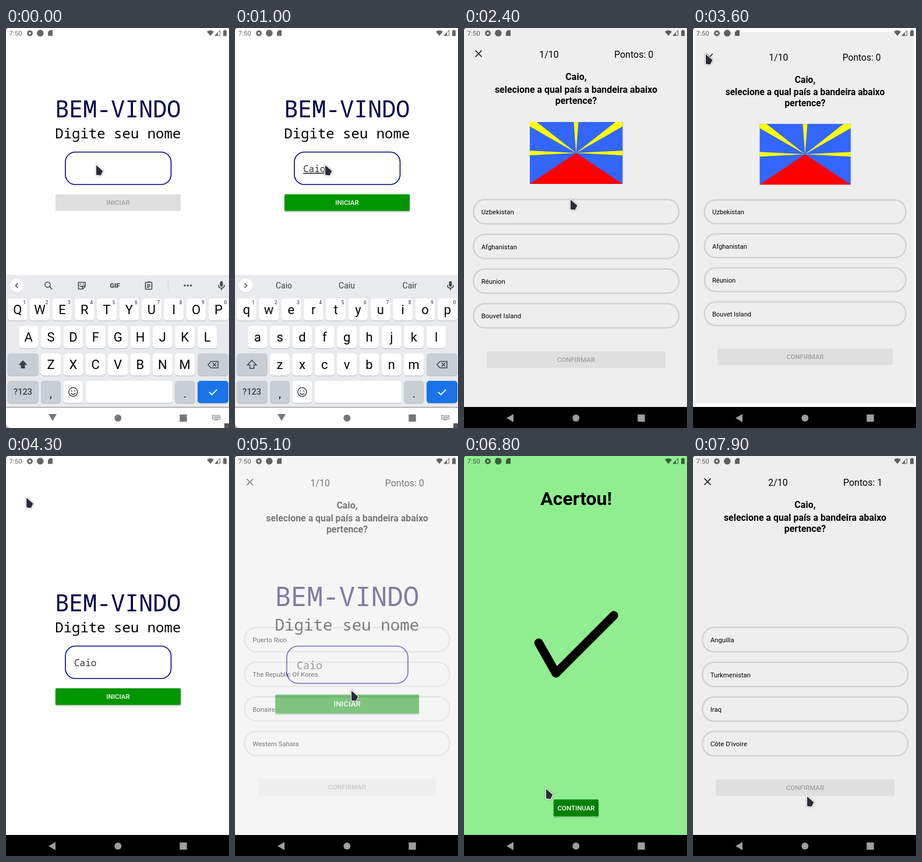
Animation of 383 by 685 pixels, one loop 8000 ms. Source, as an HTML page:

```html
<!DOCTYPE html>
<html lang="pt">
<head>
<meta charset="utf-8">
<title>Quiz de bandeiras</title>
<style>
html, body { margin: 0; width: 100%; height: 100%; overflow: hidden; background: #fff; }
svg { display: block; width: 383px; height: 685px; font-family: Roboto, sans-serif; }
.mono { font-family: "Noto Sans Mono", monospace; }
.mid { text-anchor: middle; }
.line { fill: none; stroke: #45484c; stroke-width: 1.6; }
text { white-space: pre; }
</style>
</head>
<body>
<svg id="stage" viewBox="0 0 383 685" xmlns="http://www.w3.org/2000/svg"></svg>
<script>
const LOOP = 8000, STEP = 100, CX = 191.5, CY = 324.5;
const NAME = 'Caio';
const stage = document.getElementById('stage');
const $ = id => document.getElementById(id);

const rect = (x, y, w, h, fill, rx = 0, more = '') =>
  `<rect x="${x}" y="${y}" width="${w}" height="${h}" rx="${rx}" fill="${fill}" ${more}/>`;
const text = (x, y, size, str, more = '') =>
  `<text x="${x}" y="${y}" font-size="${size}" ${more}>${str}</text>`;
const path = (d, more = 'class="line"') => `<path d="${d}" ${more}/>`;
const circle = (x, y, r, more) => `<circle cx="${x}" cy="${y}" r="${r}" ${more}/>`;
const group = (id, body, more = '') => `<g id="${id}" ${more}>${body}</g>`;

function button(x, y, w, label, fill, color) {
  const shadow = color === '#fff' ? 'filter="url(#drop)"' : '';
  return rect(x, y, w, 28.5, fill, 1.5, shadow) +
    text(x + w / 2, y + 18.2, 11.5, label, `class="mid" font-weight="500" fill="${color}"`);
}

// A button with a grey "off" and a green "on" version
const toggleButton = (id, x, y, w, label, green) =>
  group(id + 'Off', button(x, y, w, label, '#dfdfdf', '#a1a1a1')) +
  group(id + 'On', button(x, y, w, label, green, '#fff'));

function homeScreen() {
  return group('home', group('homeBody',
    text(192.3, 152.5, 40, 'BEM-VINDO', 'class="mono mid" fill="#00004d"') +
    text(192.3, 189, 24, 'Digite seu nome', 'class="mono mid"') +
    rect(102, 212.5, 181.5, 55.5, '#fff', 17, 'stroke="#00008b" stroke-width="1.6"') +
    text(117, 247, 16, '', 'class="mono" id="typed" fill="#333"') +
    rect(117, 229, 1.4, 22, '#00695c', 0, 'id="caret"') +
    toggleButton('start', 85, 284.7, 215, 'INICIAR', '#009600')));
}

function option(id, label, i) {
  const y = 293.8 + i * 59.4;
  return group(`${id}opt${i}`,
    rect(16.2, y, 352.8, 41.5, 'none', 20, 'stroke="#d2d2d2" stroke-width="2.6"') +
    text(29.7, y + 25.4, 11.4, label));
}

function question(id, count, points, options, flag) {
  const bold = 'class="mid" font-weight="700"';
  return group(id,
    rect(0, 0, 383, 649, '#eee') +
    path('M19.5 38.5L30.5 49.5M30.5 38.5L19.5 49.5', 'stroke="#000" stroke-width="1.5"') +
    text(146, 51, 16, count, 'class="mid"') +
    text(258, 51, 16, 'Pontos: ' + points) +
    text(192.5, 89, 16, NAME + ',', bold) +
    text(192.5, 111, 15.9, 'selecione a qual país a bandeira abaixo', bold) +
    text(192.5, 130, 15.9, 'pertence?', bold) +
    group(id + 'flag', flag) +
    options.map((label, i) => option(id, label, i)).join('') +
    toggleButton(id + 'ok', 39, 553.7, 307, 'CONFIRMAR', '#008000'));
}

function rayFlag() {
  const ray = (a, b, c = '') => path(`M192.5 214L${a}L${c ? c + 'L' : ''}${b}Z`, 'fill="#ff0"');
  return rect(113, 161, 159.5, 106, '#36f') +
    ray('113 210', '113 218') + ray('272.5 210', '272.5 218') +
    ray('188.5 161', '196.5 161') +
    ray('113 168.5', '125 161', '113 161') + ray('272.5 168.5', '260 161', '272.5 161') +
    path('M113 267L192.5 214L272.5 267Z', 'fill="#f00"');
}

function starFlag() {
  let star = '';
  for (let i = 0; i < 10; i++) {
    const r = i % 2 ? 6.7 : 17.5, a = i * Math.PI / 5;
    star += `${143.7 + r * Math.sin(a)},${213.7 - r * Math.cos(a)} `;
  }
  return [0, 1, 2, 3, 4].map(i =>
    rect(113, 161 + i * 21.2, 159, 21.2, i % 2 ? '#fff' : '#e00')).join('') +
    path('M113 161L205 214L113 267Z', 'fill="#0050f0"') +
    `<polygon points="${star}" fill="#fff"/>`;
}

function resultScreen() {
  return group('result',
    rect(0, 0, 383, 649, '#90ee90') +
    text(192.7, 84, 32, 'Acertou!', 'class="mid" font-weight="700"') +
    path('M128.3 320L158 372L257.3 273', 'fill="none" stroke="#000" stroke-width="15" stroke-linecap="round" stroke-linejoin="round"') +
    button(154, 588.3, 77, 'CONTINUAR', '#008000', '#fff'));
}

const key = (x, y, w, fill = '#fff') =>
  rect(x, y + 1, w, 38, '#b4b7bb', 5) + rect(x, y, w, 38, fill, 5);

function keyboard() {
  const rows = [['QWERTYUIOP', 2.7, 463], ['ASDFGHJKL', 21.8, 510.3], ['ZXCVBNM', 60, 557.3]];
  const grey = '#c9cdd4';
  let keys = '', upper = '', lower = '';
  for (const [letters, x0, y] of rows) {
    [...letters].forEach((c, i) => {
      const x = x0 + i * 38.35;
      keys += key(x, y, 34);
      upper += text(x + 17, y + 27, 22, c, 'class="mid"');
      lower += text(x + 17, y + 26.5, 22, c.toLowerCase(), 'class="mid"');
      if (y === 463) keys += text(x + 29, y + 10, 8.5, (i + 1) % 10, 'class="mid" font-weight="500" fill="#55585c"');
    });
  }
  const shift = 'M29 569L36.5 577H32.5V583H25.5V577H21.5Z';
  keys += key(2.7, 557.3, 53, grey) + key(329, 557.3, 53, grey) +
    key(2.7, 604.3, 53, grey) + key(60, 604.3, 34, grey) + key(98.3, 604.3, 34) +
    key(136.6, 604.3, 149.4) + key(290.3, 604.3, 34, grey) + key(329, 604.3, 53, '#1a73e8') +
    path('M347 576.5L352 571H364V582H352Z M355 573.5L361 579.5M361 573.5L355 579.5') +
    text(29, 628, 14.5, '?123', 'class="mid" font-weight="500" fill="#3c4043"') +
    text(77, 633, 18, ',', 'class="mid"') + text(307.3, 633, 18, '.', 'class="mid"') +
    circle(115.3, 623.3, 7.5, 'class="line"') +
    circle(112.7, 621.5, 1.1, 'fill="#45484c"') + circle(117.9, 621.5, 1.1, 'fill="#45484c"') +
    path('M111.3 625Q115.3 630 119.3 625') +
    path('M349 623.5L353.5 628L362.5 619', 'fill="none" stroke="#fff" stroke-width="1.8"');
  const tools =
    circle(71.5, 439.5, 4.5, 'class="line"') + path('M75 443L79.5 447.5') +
    path('M124.5 435.5H136V443L131.5 447H124.5ZM136 442H131.5V447M127 441Q129 445 132 441M127 438.5H129M132 438.5H134') +
    text(187, 445, 11.5, 'GIF', 'class="mid" font-weight="800" fill="#45484c"') +
    rect(239.5, 435.5, 11, 12, 'none', 1, 'class="line"') +
    path('M242.5 435H247.5M242 439.5H248M242 442H248M242 444.5H246') +
    rect(278, 432, 1, 18, '#d0d2d6') +
    [307, 312.3, 317.6].map(x => circle(x, 441, 1.7, 'fill="#45484c"')).join('');
  return group('keyboard',
    rect(0, 423, 383, 227, '#e8eaed') + keys +
    group('upper', upper + path(shift, 'fill="#3c4043"')) +
    group('lower', lower + path(shift)) +
    circle(18.5, 441.7, 12, 'fill="#c8cacd"') + circle(18.5, 441, 12, 'fill="#fff"') +
    path('', 'id="chevron" class="line"') + group('tools', tools) +
    [84, 192, 300].map((x, i) => text(x, 446, 14, '', `id="hint${i}" class="mid" fill="#3c4043"`)).join('') +
    rect(367.5, 433.5, 5, 9.5, '#45484c', 2.5) + path('M364.8 440Q365 445.5 370 445.5Q375 445.5 375.2 440M370 445V449'));
}

function statusBar() {
  let teeth = '';
  for (let i = 0; i < 8; i++) teeth += rect(39.8, 3.8, 2.4, 3, '#000', 0, `transform="rotate(${i * 45} 41 9)"`);
  return `<g opacity=".6">` + text(5.5, 13, 11.5, '7:50') + teeth +
    circle(41, 9, 3, 'fill="none" stroke="#000" stroke-width="2.2"') +
    circle(58.8, 8.8, 5.8, '') +
    path('M75 3.8H80V13.5H72V7Z', '') +
    path('M345 6.3Q351 1.5 357 6.3L351 13.5Z', '') +
    path('M358.8 13L367.5 4V13Z', 'fill="none" stroke="#000" stroke-width="1"') + path('M359 13L364 7.5V13Z', '') +
    path('M373 4.5H374.7V3.2H377.3V4.5H379V13.8H373Z', '') + '</g>' +
    path('M0 0H3Q.6 .6 0 3Z', 'fill="#333"');
}

function navBar() {
  const icons = circle(192.3, 668, 6, '') + rect(298.3, 661.7, 12.4, 12.4, 'inherit');
  const shared = fill => `<g fill="${fill}">` + circle(192.3, 668, 6, '') + path('M298.3 661.8H310.7V674.2H298.3Z', '');
  return group('navDark', rect(0, 649, 383, 36, '#000') + shared('#9e9e9e') + path('M73 668L85 661V675Z', '') + '</g>') +
    group('navLight', rect(0, 649.5, 383, 36, '#fff') + shared('#777') + path('M73 661H87L80 673Z', '') + '</g>' +
      rect(355, 664, 12.5, 5.5, 'none', 0, 'stroke="#888" stroke-width="2" stroke-dasharray="1.5 1"') +
      rect(358, 670.5, 6, 1.3, '#888') + rect(357, 666, 9, 1.4, '#888'));
}

stage.innerHTML =
  '<defs><filter id="drop" x="-10%" y="-20%" width="120%" height="160%"><feDropShadow dx="0" dy="1.3" stdDeviation="1.1" flood-opacity=".35"/></filter></defs>' +
  rect(0, 0, 383, 685, '#fff') + homeScreen() +
  question('q1', '1/10', 0, ['Uzbekistan', 'Afghanistan', 'Réunion', 'Bouvet Island'], rayFlag()) +
  question('q2', '1/10', 0, ['Puerto Rico', 'The Republic Of Korea', 'Bonaire', 'Western Sahara'], starFlag()) +
  resultScreen() +
  question('q3', '2/10', 1, ['Anguilla', 'Turkmenistan', 'Iraq', "Côte D'ivoire"], '') +
  keyboard() + navBar() + statusBar() +
  group('corners', path('M0 677Q1 684 8 685H0Z', 'fill="#aaa"') + rect(375, 677, 8, 8, '#555')) +
  group('cursor', path('M0 0L11.5 10L7.5 17.5L0 16.5Z', 'fill="#2a2d38" stroke="#fff" stroke-width="2.4" paint-order="stroke" style="filter:drop-shadow(0 .5px .8px #0007)"'));

// Cursor stops: time, x, y
const stops = [
  [0, 155, 235], [1300, 155, 235], [1500, 160, 250], [1700, 160, 250], [1900, 183, 294],
  [2700, 183, 294], [3300, 22, 45], [4200, 22, 45], [4800, 200, 402], [5300, 200, 402],
  [5900, 156, 316], [6100, 156, 316], [6600, 141, 570], [6900, 141, 570], [7400, 196, 583], [8000, 196, 583]
];
// Suggestions above the keyboard: start time, words
const hints = [[0], [600, 'Ca', 'Casa', 'Cada'], [800, 'Cai', 'Caiu', 'Cada'], [1000, NAME, 'Caiu', 'Cair'], [1300]];
const presses = [200, 500, 800, 1000];

const clamp = v => Math.min(1, Math.max(0, v));
const show = (id, on) => $(id).setAttribute('display', on ? 'inline' : 'none');

function place(id, scale, opacity) {
  show(id, opacity > 0);
  $(id).setAttribute('opacity', opacity);
  $(id).setAttribute('transform', `translate(${CX} ${CY}) scale(${scale}) translate(${-CX} ${-CY})`);
}

// Screen opening: the old one grows, the new one grows into place and fades in
function push(t, start) {
  const u = clamp((t - start) / 300), p = 1 - (1 - u) ** 3.6;
  return { old: 1 + 0.15 * p, size: 0.85 + 0.15 * p, alpha: clamp((u - 0.49) * 3), done: u === 1 };
}

function cursorAt(t) {
  const i = Math.max(1, stops.findIndex(s => s[0] > t));
  const [t0, x0, y0] = stops[i - 1], [t1, x1, y1] = stops[i];
  const u = (t - t0) / (t1 - t0), e = u * u * (3 - 2 * u);
  return [x0 + (x1 - x0) * e, y0 + (y1 - y0) * e];
}

function drawScreens(t) {
  const first = push(t, 2100), second = push(t, 4900), third = push(t, 7600);
  const back = clamp((t - 3500) / 500);
  if (t < 3500) place('home', first.old, first.done ? 0 : 1);
  else if (t < 4900) place('home', 1.15 - 0.15 * back, clamp(back / 0.79));
  else place('home', second.old, second.done ? 0 : 1);
  place('q1', first.size - 0.1 * back, t < 4000 ? first.alpha * clamp((0.65 - back) / 0.4) : 0);
  place('q2', second.size, t < 6800 ? second.alpha : 0);
  place('result', third.old, t >= 6800 && !third.done ? 1 : 0);
  place('q3', third.size, third.alpha);
}

function drawTyping(t) {
  const count = presses.filter(p => t >= p).length, open = t < 2200;
  $('typed').textContent = NAME.slice(0, count);
  $('typed').setAttribute('text-decoration', open ? 'underline' : 'none');
  $('caret').setAttribute('x', 117 + count * 9.6);
  show('caret', t >= 200 && t < 1000);
  show('startOff', !count);
  show('startOn', count);
  show('upper', t < 300);
  show('lower', t >= 300);
  show('tools', t < 500);
  $('chevron').setAttribute('d', t < 500 ? 'M20.5 437L16.5 441L20.5 445' : 'M16.5 437L20.5 441L16.5 445');
  const words = hints.filter(h => t >= h[0]).pop();
  for (let i = 0; i < 3; i++) $('hint' + i).textContent = words[i + 1] || '';
  show('keyboard', t < 2300);
  $('keyboard').setAttribute('transform', `translate(0 ${226 * clamp((t - 2100) / 200)})`);
  $('homeBody').setAttribute('transform', `translate(0 ${open ? 0 : 113})`);
  show('navLight', open);
  show('corners', t < 1700);
}

function drawChoice(t) {
  const chosen = t >= 6100;
  for (const id of ['q1', 'q2', 'q3']) {
    const on = id === 'q2' && chosen;
    show(id + 'okOn', on);
    show(id + 'okOff', !on);
  }
  show('q1flag', t >= 2400);
  show('q2flag', t >= 5300);
  const row = $('q2opt0'), box = row.firstChild;
  box.setAttribute('fill', chosen ? '#90ee90' : 'none');
  box.setAttribute('stroke', chosen ? '#3cb371' : '#d2d2d2');
  row.setAttribute('opacity', chosen ? 0.38 + 0.62 * clamp((t - 6100) / 300) : t >= 6000 ? 0.6 : 1);
}

function draw(t) {
  drawScreens(t);
  drawTyping(t);
  drawChoice(t);
  $('cursor').setAttribute('transform', `translate(${cursorAt(t)})`);
}

const begin = performance.now();
function tick() {
  const t = (performance.now() - begin) % LOOP;
  draw(Math.floor(t / STEP) * STEP);
  requestAnimationFrame(tick);
}
tick();
</script>
</body>
</html>
```
